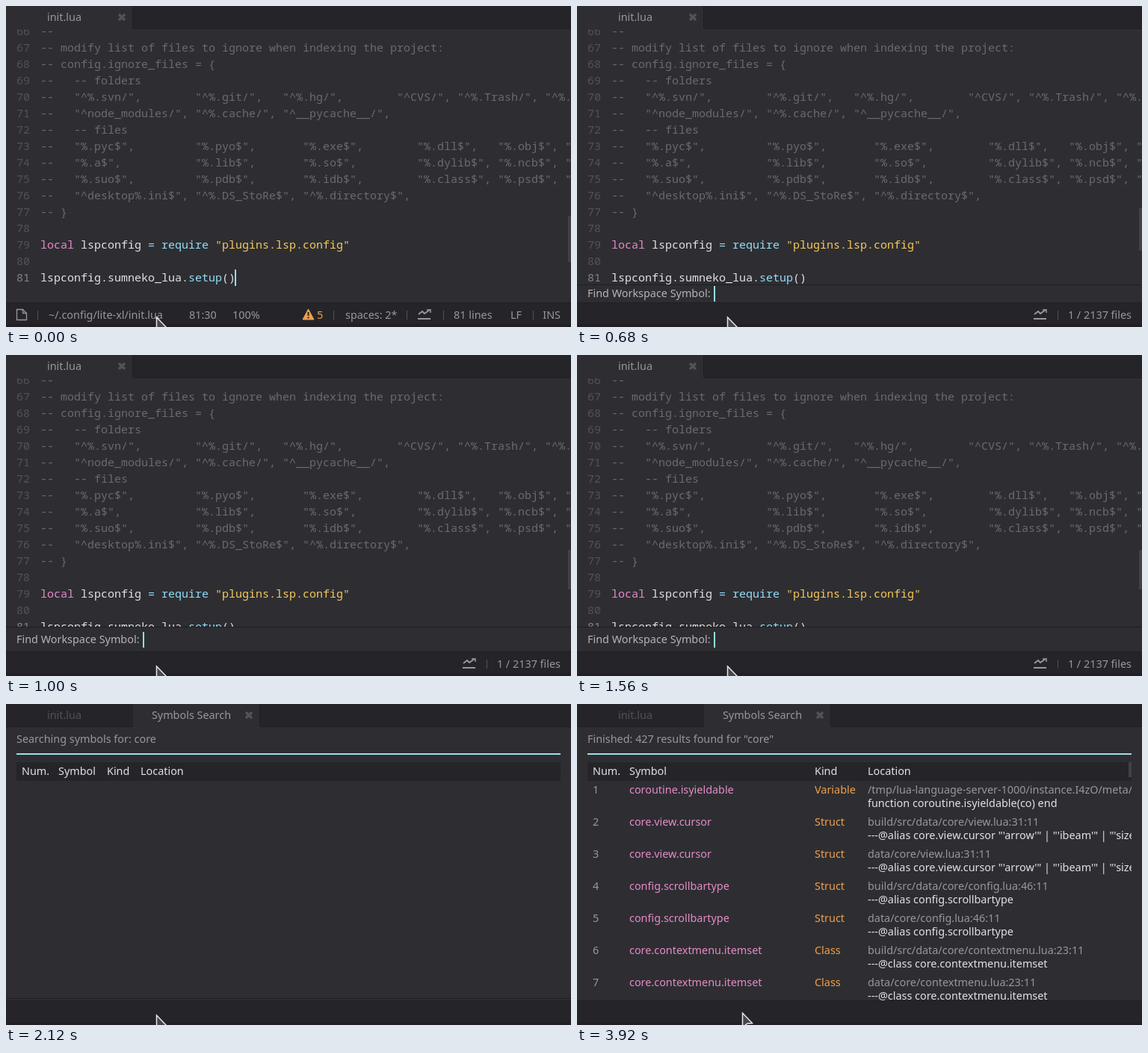
Animation of 756 by 430 pixels, one loop 4 s. Source, as an HTML page with a canvas:

```html
<!DOCTYPE html>
<html lang="en">
<head>
<meta charset="utf-8">
<title>Workspace symbol search</title>
<style>
html, body { margin: 0; width: 100%; height: 100%; overflow: hidden; background: #2e2e32; }
canvas { display: block; }
</style>
</head>
<body>
<canvas id="stage" width="756" height="430"></canvas>
<script>
const ctx = document.getElementById('stage').getContext('2d');
const LOOP = 4000, STEP = 40;
const OPEN = 680, TYPE = 1640, SUBMIT = 1840, RESULTS = 3120;
const STATUS_TOP = 397, PANEL_HEIGHT = 33;
const UI = '14.4px "Noto Sans", "Open Sans", sans-serif';
const MONO = '15px "Noto Sans Mono", "DejaVu Sans Mono", monospace';
const C = {
  back: '#2e2e32', bar: '#252529', divider: '#202024', text: '#97979c', bright: '#e1e1e6',
  dim: '#525257', comment: '#676b6f', pink: '#e58ac9', orange: '#f0a04b', yellow: '#f7c95c',
  blue: '#93ddfa', scroll: '#414146'
};

const FIRST_LINE = 66;
const code = [
  '--',
  '-- modify list of files to ignore when indexing the project:',
  '-- config.ignore_files = {',
  '--   -- folders',
  '--   "^%.svn/",        "^%.git/",   "^%.hg/",        "^CVS/", "^%.Trash/", "^%.Trash-.*/",',
  '--   "^node_modules/", "^%.cache/", "^__pycache__/",',
  '--   -- files',
  '--   "%.pyc$",         "%.pyo$",       "%.exe$",        "%.dll$",   "%.obj$", "%.o$",',
  '--   "%.a$",           "%.lib$",       "%.so$",         "%.dylib$", "%.ncb$", "%.sdf$",',
  '--   "%.suo$",         "%.pdb$",       "%.idb$",        "%.class$", "%.psd$", "%.db$",',
  '--   "^desktop%.ini$", "^%.DS_StoRe$", "^%.directory$",',
  '-- }',
  '',
  [['local', C.pink], [' lspconfig ', C.bright], ['= require', C.blue], [' "plugins.lsp.config"', C.yellow]],
  '',
  [['lspconfig.sumneko_lua.', C.bright], ['setup', C.blue], ['()', C.bright]]
];

const cursorAlias = '---@alias core.view.cursor "\'arrow\'" | "\'ibeam\'" | "\'sizeh\'" | "\'sizev\'"';
const results = [
  ['coroutine.isyieldable', 'Variable', '/tmp/lua-language-server-1000/instance.I4zO/meta/coroutine.lua', 'function coroutine.isyieldable(co) end'],
  ['core.view.cursor', 'Struct', 'build/src/data/core/view.lua:31:11', cursorAlias],
  ['core.view.cursor', 'Struct', 'data/core/view.lua:31:11', cursorAlias],
  ['config.scrollbartype', 'Struct', 'build/src/data/core/config.lua:46:11', '---@alias config.scrollbartype'],
  ['config.scrollbartype', 'Struct', 'data/core/config.lua:46:11', '---@alias config.scrollbartype'],
  ['core.contextmenu.itemset', 'Class', 'build/src/data/core/contextmenu.lua:23:11', '---@class core.contextmenu.itemset'],
  ['core.contextmenu.itemset', 'Class', 'data/core/contextmenu.lua:23:11', '---@class core.contextmenu.itemset']
];

const mix = (a, b, p) => a + (b - a) * p;

function rect(x, y, w, h, color) {
  ctx.fillStyle = color;
  ctx.fillRect(x, y, w, h);
}

function text(str, x, y, color, font = UI, align = 'left') {
  ctx.font = font;
  ctx.textAlign = align;
  ctx.fillStyle = color;
  ctx.fillText(str, x, y);
}

function path(points, { fill, stroke, width = 1, close = false }) {
  ctx.beginPath();
  points.forEach(([x, y]) => ctx.lineTo(x, y));
  if (close) ctx.closePath();
  if (fill) { ctx.fillStyle = fill; ctx.fill(); }
  if (stroke) { ctx.strokeStyle = stroke; ctx.lineWidth = width; ctx.stroke(); }
}

function clipped(x, y, w, h, draw) {
  ctx.save();
  ctx.beginPath();
  ctx.rect(x, y, w, h);
  ctx.clip();
  draw();
  ctx.restore();
}

function tab(title, x, active) {
  if (active) {
    rect(x, 0, 170, 31, C.back);
    rect(x + 169, 0, 1, 30, C.divider);
    const cx = x + 155, style = { stroke: C.dim, width: 3.4 };
    path([[cx - 4, 11], [cx + 4, 19]], style);
    path([[cx + 4, 11], [cx - 4, 19]], style);
  }
  text(title, x + 78, 20, active ? C.text : C.dim, UI, 'center');
}

function drawTabs(searching) {
  rect(0, 0, 756, 30, C.bar);
  rect(0, 30, 756, 1, C.divider);
  tab('init.lua', 0, !searching);
  if (searching) tab('Symbols Search', 170, true);
}

function drawEditor(t) {
  clipped(0, 31, 756, STATUS_TOP - 31, () => {
    code.forEach((line, i) => {
      const y = 39 + i * 22;
      text(FIRST_LINE + i, 14, y, i === code.length - 1 ? '#83838f' : C.dim, MONO);
      let x = 46;
      for (const [str, color] of Array.isArray(line) ? line : [[line, C.comment]]) {
        text(str, x, y, color, MONO);
        x += ctx.measureText(str).width;
      }
    });
    if (t < 280) rect(306, 353, 2, 22, C.blue);
  });
  const p = t < OPEN ? 0 : 1 - 0.47 ** ((t - OPEN) / STEP + 1);
  const top = mix(281, 261, p);
  rect(752, top, 4, mix(343, 314, p) - top, C.scroll);
}

function drawPanel(t) {
  const steps = (t - (t < SUBMIT ? OPEN : SUBMIT)) / STEP;
  const height = t < SUBMIT
    ? PANEL_HEIGHT * (1 - 0.27 ** (steps + 1))
    : PANEL_HEIGHT * 0.7 ** Math.min(steps, 7);
  const top = Math.round(STATUS_TOP - height);
  rect(0, top, 756, STATUS_TOP - top, C.back);
  rect(0, top, 756, 1, C.divider);
  if (t >= SUBMIT) return;

  const middle = Math.round((top + STATUS_TOP) / 2);
  clipped(0, top, 756, STATUS_TOP - top, () => {
    text('Find Workspace Symbol:', 14, middle + 5, '#b4b4b9');
    const typed = 'core'.slice(0, Math.max(0, (t - TYPE) / STEP + 1));
    text(typed, 183, middle + 5, C.bright);
    const caretOn = typed || (t - OPEN) % 800 < 400;
    if (caretOn) rect(183 + ctx.measureText(typed).width, middle - 10, 2, 21, C.blue);
  });
}

function chart(x) {
  const style = { stroke: C.text, width: 2 };
  path([[x + 1, 413], [x + 6, 409], [x + 9, 412], [x + 16, 407]], style);
  path([[x + 12, 407], [x + 17, 407], [x + 17, 411]], { ...style, width: 1.5 });
  path([[x, 419], [x + 17, 419]], style);
}

function drawStatus(t) {
  rect(0, STATUS_TOP, 756, 33, C.bar);
  rect(0, STATUS_TOP, 756, 1, C.divider);
  rect(0, 426, 756, 4, '#241e25');
  if (t >= SUBMIT) return;

  const label = (str, x, color = C.text) => text(str, x, 419, color);
  const separator = x => rect(x, 408, 1, 12, C.dim);
  if (t >= OPEN) {
    chart(611);
    separator(643);
    text('1 / 2137 files', 742, 419, C.text, UI, 'right');
    return;
  }
  path([[14.5, 406.5], [22.5, 406.5], [27.5, 411.5], [27.5, 420.5], [14.5, 420.5]], { stroke: C.text, width: 1.3, close: true });
  path([[22.5, 406.5], [22.5, 411.5], [27.5, 411.5]], { stroke: C.text, width: 1.3 });
  path([[404.5, 406], [412, 420], [397, 420]], { fill: C.orange, stroke: C.orange, close: true });
  rect(403.5, 410, 2, 5, C.bar);
  rect(403.5, 416.5, 2, 2, C.bar);
  [42, 438, 536, 585, 705].forEach(separator);
  label('~/.config/lite-xl/init.lua', 57);
  label('81:30', 245);
  label('100%', 303);
  label('5', 416, C.orange);
  label('spaces: 2*', 454);
  chart(551);
  label('81 lines', 599);
  label('LF', 675);
  text('INS', 742, 419, C.text, UI, 'right');
}

function drawSearch(t) {
  const done = t >= RESULTS;
  const [kindX, placeX] = done ? [318, 389] : [135, 180];
  text(done ? 'Finished: 427 results found for "core"' : 'Searching symbols for: core', 14, 52, C.text);
  rect(14, 66, 728, 2, '#a3dcec');
  rect(14, 78, 728, 25, C.bar);
  [['Num.', 21], ['Symbol', 70], ['Kind', kindX], ['Location', placeX]]
    .forEach(([title, x]) => text(title, x, 95, C.bright));
  if (!done) return;

  clipped(14, 103, 728, STATUS_TOP - 103, () => {
    results.forEach(([symbol, kind, place, source], i) => {
      const y = 120 + i * 43;
      text(i + 1, 21, y, C.text);
      text(symbol, 70, y, C.pink);
      text(kind, kindX, y, C.orange);
      text(place, placeX, y, C.text);
      text(source, placeX, y + 18, C.bright);
    });
  });
  rect(738, 78, 4, 20, C.scroll);
}

function drawPointer(t) {
  let x = 201, y = 417;
  if (t >= RESULTS) {
    const p = Math.min(1, (t - RESULTS) / 200);
    x = mix(210, 221, p);
    y = t >= 3680 ? 414 : mix(416, 415, p);
  }
  const shape = [[0, 0], [13, 13.5], [6.5, 14], [0, 19]];
  path(shape.map(([dx, dy]) => [x + dx + 0.5, y + dy]), { fill: '#48484c', stroke: '#e6e6e8', width: 1.5, close: true });
}

function frame(now) {
  const t = Math.floor(now % LOOP / STEP) * STEP;
  const searching = t >= SUBMIT;
  rect(0, 0, 756, 430, C.back);
  drawTabs(searching);
  if (searching) drawSearch(t); else drawEditor(t);
  if (t >= OPEN && t < RESULTS) drawPanel(t);
  drawStatus(t);
  drawPointer(t);
  requestAnimationFrame(frame);
}
requestAnimationFrame(frame);
</script>
</body>
</html>
```
